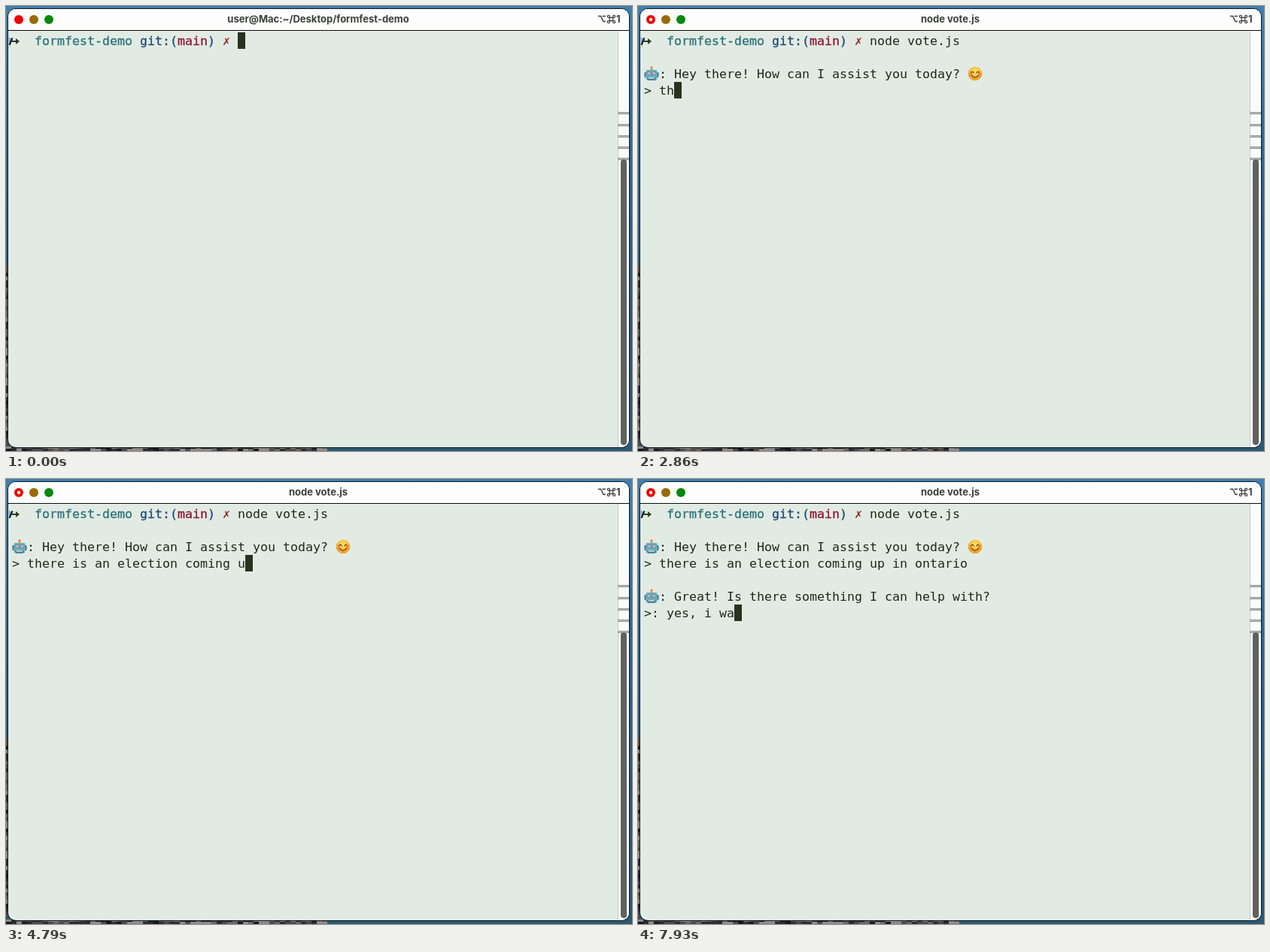
An HTML page that plays this animation: 832x592 px, repeating every 8000 ms.

```html
<!DOCTYPE html>
<html lang="en">
<head>
<meta charset="utf-8">
<title>Terminal chat</title>
<style>
  html, body { margin: 0; width: 100%; height: 100%; overflow: hidden; background: #2f648f; }
  svg { display: block; width: 832px; height: 592px; }
  .mono text { font: 16.61px "DejaVu Sans Mono", monospace; fill: #20281b; white-space: pre; }
  .mono .prompt text { stroke-width: .3px; }
  .mono .dir { fill: #2d737b; stroke: #2d737b; }
  .mono .git { fill: #1f4a75; stroke: #1f4a75; }
  .mono .branch { fill: #8c1638; stroke: #8c1638; }
  .mono .dirty { fill: #8a2a22; }
  .title { font: 700 13px Inter, sans-serif; fill: #3c3e3c; }
</style>
</head>
<body>
<svg viewBox="0 0 832 592">
  <defs>
    <linearGradient id="sea" x2="0" y2="1">
      <stop offset="0" stop-color="#4180ae"/>
      <stop offset=".3" stop-color="#2f679a"/>
      <stop offset=".7" stop-color="#2b587a"/>
      <stop offset="1" stop-color="#2d5870"/>
    </linearGradient>
    <radialGradient id="sun" cy=".35">
      <stop offset=".3" stop-color="#ffd95a"/>
      <stop offset="1" stop-color="#f0a52c"/>
    </radialGradient>
    <clipPath id="frame"><rect x="3" y="4" width="825" height="583" rx="10"/></clipPath>
    <g id="robot">
      <path d="M10 5V2" stroke="#9a8a80" stroke-width="1.5"/>
      <circle cx="10" cy="2" r="1.7" fill="#ee8a3c"/>
      <path d="M7 5.5Q10 2.5 13 5.5Z" fill="#e08a45"/>
      <rect x=".5" y="8" width="3" height="7" rx="1.3" fill="#3f7f94"/>
      <rect x="16.5" y="8" width="3" height="7" rx="1.3" fill="#3f7f94"/>
      <path d="M4 5H16Q17.5 5 17.5 7V16Q17.5 19 14 19H6Q2.5 19 2.5 16V7Q2.5 5 4 5Z" fill="#69b3c4"/>
      <path d="M4 15H16L14.5 19H5.5Z" fill="#4d7f94"/>
      <g fill="#f4fafa" stroke="#35606e" stroke-width=".8">
        <circle cx="6.8" cy="9.5" r="2.3"/><circle cx="13.2" cy="9.5" r="2.3"/>
      </g>
      <circle cx="6.8" cy="9.5" r=".9" fill="#b54a3f"/><circle cx="13.2" cy="9.5" r=".9" fill="#b54a3f"/>
      <path d="M10 11L8.8 13.2H11.2Z" fill="#d66a4e"/>
      <path d="M6 15.8H14" stroke="#e3edef" stroke-width="1.8" stroke-dasharray="1.4 .5"/>
    </g>
    <g id="smile">
      <circle cx="10" cy="10" r="9.3" fill="url(#sun)"/>
      <circle cx="4.2" cy="11.6" r="2.3" fill="#f08a4a" opacity=".75"/>
      <circle cx="15.8" cy="11.6" r="2.3" fill="#f08a4a" opacity=".75"/>
      <path d="M4.5 9Q6.3 5.6 8.1 9M11.9 9Q13.7 5.6 15.5 9M5.5 12.3Q10 18 14.5 12.3"
        fill="none" stroke="#6b3d18" stroke-width="1.3" stroke-linecap="round"/>
    </g>
  </defs>

  <rect width="832" height="592" fill="url(#sea)"/>
  <g id="rocks"></g>
  <rect x="2.5" y="3.5" width="826" height="584" rx="10.5" fill="none" stroke="#0c1822"/>

  <g clip-path="url(#frame)">
    <rect width="832" height="592" fill="#e2ebe3"/>
    <rect y="4" width="832" height="28" fill="#fcfdfc"/>
    <rect y="32" width="832" height="1" fill="#0b0d0b"/>
    <rect x="813" y="33" width="15" height="554" fill="#fafcfa"/>
    <rect x="813" y="33" width="1" height="554" fill="#c5cbc6"/>
    <g id="marks"></g>
    <rect x="817" y="204" width="8" height="380" rx="4" fill="#606260"/>
  </g>

  <circle cx="17" cy="18" r="6" fill="#ee0505"/>
  <circle id="busy" cx="17" cy="18" r="2.2" fill="#fff"/>
  <circle cx="37" cy="18" r="6" fill="#986a08"/>
  <circle cx="57" cy="18" r="6" fill="#0a870c"/>
  <text class="title" id="title" x="415" y="22" text-anchor="middle"></text>
  <g fill="none" stroke="#3c3e3c" stroke-width="1.4">
    <path d="M787 13.5H790.5L794 20.5H797M792.5 13.5H797"/>
    <path d="M802.3 15.3H806.7V19.7H802.3ZM802.3 15.3H800.8A1.5 1.5 0 1 1 802.3 13.8ZM806.7 15.3V13.8A1.5 1.5 0 1 1 808.2 15.3ZM806.7 19.7H808.2A1.5 1.5 0 1 1 806.7 21.2ZM802.3 19.7V21.2A1.5 1.5 0 1 1 800.8 19.7Z" stroke-width="1.2"/>
  </g>
  <text class="title" x="811" y="22">1</text>

  <g class="mono">
    <g class="prompt">
      <path d="M4 41L8 45L4 50Z" fill="#7da7dc"/>
      <path d="M4.5 52L8.5 42.5" stroke="#11160f" stroke-width="2"/>
      <path d="M8 46H13V43L18 47L13 51V48H8Z" fill="#26401f"/>
      <text class="dir" x="38" y="52">formfest-demo</text>
      <text class="git" x="178" y="52">git:(</text>
      <text class="branch" x="228" y="52">main</text>
      <text class="git" x="268" y="52">)</text>
      <text class="dirty" x="288" y="52">✗</text>
    </g>
    <text id="command" x="308" y="52"></text>
    <use id="bot1" href="#robot" x="8" y="80"/>
    <text id="reply1" x="28" y="96"></text>
    <use id="grin" href="#smile" x="438" y="80"/>
    <text id="input1" x="8" y="118"></text>
    <use id="bot2" href="#robot" x="8" y="146"/>
    <text id="reply2" x="28" y="162"></text>
    <text id="input2" x="8" y="184"></text>
  </g>
  <rect id="cursor" width="10" height="22" fill="#27331f"/>
</svg>
<script>
  const LOOP = 8000, TICK = 1000 / 14;
  const RUN = 930, BOT1 = 1000, ASK1 = 1790, ENTER = 5930, ASK2 = 6710;
  const $ = id => document.getElementById(id);

  // Each burst: start in ms, number of ticks, length reached at its end.
  const lines = {
    command: { text: "node vote.js", bursts: [[70, 12, 12]] },
    reply1: { text: "Hey there! How can I assist you today? ", bursts: [[1070, 10, 40]] },
    input1: {
      text: "there is an election coming up in ontario",
      bursts: [[2710, 1, 1], [2860, 1, 2], [2930, 9, 12], [3640, 2, 15], [3860, 5, 20], [4210, 3, 24],
        [4500, 3, 28], [4790, 2, 31], [5000, 6, 37], [5500, 1, 39], [5640, 2, 41]]
    },
    reply2: { text: "Great! Is there something I can help with?", bursts: [[6000, 10, 40], [ASK2, 1, 42]] },
    input2: { text: "yes, i wa", bursts: [[7360, 5, 5], [7790, 3, 9]] }
  };

  function typed(t, bursts) {
    let n = 0;
    for (const [start, ticks, end] of bursts) {
      if (t < start - 2) break;
      const k = Math.min(ticks, Math.floor((t - start + 8) / TICK) + 1);
      n += Math.floor((end - n) * k / ticks);
    }
    return n;
  }

  function setText(id, text) {
    if ($(id).textContent !== text) $(id).textContent = text;
  }

  function show(id, visible) {
    $(id).style.display = visible ? "" : "none";
  }

  function write(id, t, start, prefix) {
    const { text, bursts } = lines[id];
    const n = typed(t, bursts);
    setText(id, t < start ? "" : prefix + text.slice(0, n));
    return n;
  }

  function draw(t) {
    const command = write("command", t, 0, "");
    const reply1 = write("reply1", t, BOT1, ": ");
    const input1 = write("input1", t, ASK1, "> ");
    const reply2 = write("reply2", t, ENTER, ": ");
    const input2 = write("input2", t, ASK2, ">: ");
    const hasGrin = reply1 === 40;

    setText("title", t < RUN ? "user@Mac:~/Desktop/formfest-demo" : "node vote.js");
    show("busy", t >= RUN);
    show("bot1", t >= BOT1);
    show("grin", hasGrin);
    show("bot2", t >= ENTER);

    const [row, col] =
      t < RUN ? [0, 30 + command] :
      t < BOT1 ? [1, 0] :
      t < ASK1 ? [2, 4 + reply1 + hasGrin] :
      t < ENTER ? [3, 2 + input1] :
      t < ASK2 ? [5, 4 + reply2] : [6, 3 + input2];
    $("cursor").setAttribute("x", 8 + 10 * col);
    $("cursor").setAttribute("y", 35 + 22 * row);
  }

  function addRect(parent, x, y, width, height, fill) {
    const rect = document.createElementNS("http://www.w3.org/2000/svg", "rect");
    Object.entries({ x, y, width, height, fill }).forEach(([k, v]) => rect.setAttribute(k, v));
    parent.append(rect);
  }

  let seed = 7;
  const random = () => (seed = seed * 16807 % 2147483647) / 2147483647;
  const stone = () => ["#17191d", "#2b2c31", "#4d4a4b", "#6b6462", "#8d8a88"][Math.floor(random() * 5)];
  for (let y = 345; y < 592; y += 5) addRect($("rocks"), 0, y, 3, 5, y < 352 ? "#6d4a3c" : stone());
  for (let x = 0; x < 425; x += 7) {
    addRect($("rocks"), x, 586, 7, 3, stone());
    addRect($("rocks"), x, 589, 7, 3, stone());
  }
  for (const y of [141, 157, 172, 187, 202]) {
    addRect($("marks"), 813, y, 15, 3, "#8b8f8b");
    addRect($("marks"), 813, y + 1, 15, 1, "#c4c7c4");
  }

  function frame() {
    draw(performance.now() % LOOP);
    requestAnimationFrame(frame);
  }
  frame();
</script>
</body>
</html>
```
